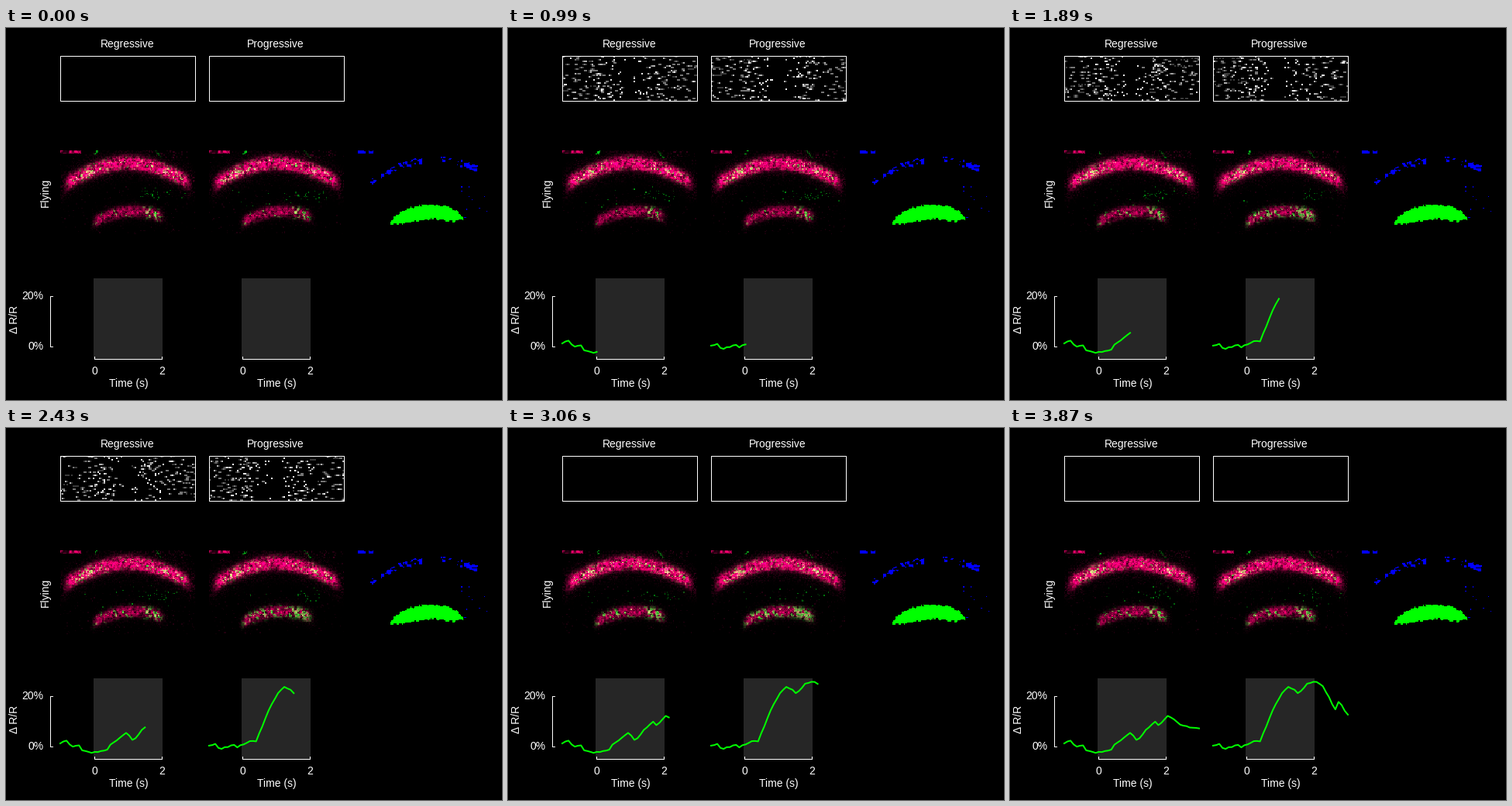
Write a matplotlib script that moves like this. It is 640 px wide and 480 px high and loops after 3960 ms.

```python
import numpy as np
import matplotlib.pyplot as plt
from matplotlib.animation import FuncAnimation
from matplotlib.patches import Rectangle

W, H, DPI = 640, 480, 100
FRAMES, INTERVAL = 44, 90
STIM_ON, STIM_OFF = 11, 32
LEFT, GAP, SPAN = 70, 192, 174
TOP, BOTTOM = 159, 266.5
ROWS, COLS = 79, 128
DOT_ROWS, DOT_COLS = 29, 87
ZERO, PER_PCT = 410.5, 3.225
PX = 72 / DPI
LIME = (0, 1, 0)

plt.rcParams["font.family"] = "Liberation Sans"
plt.rcParams["font.size"] = 10

fig = plt.figure(figsize=(W / DPI, H / DPI), dpi=DPI, facecolor="black")
ax = fig.add_axes([0, 0, 1, 1])
ax.axis("off")

X, Y = np.meshgrid(LEFT + (np.arange(COLS) + 0.5) * SPAN / COLS,
                   TOP + (np.arange(ROWS) + 0.5) * (BOTTOM - TOP) / ROWS)


# --- drawing helpers, in stage pixels

def label(x, y, text, ha="center", turn=0):
    ax.text(x, y, text, color="white", ha=ha, va="baseline",
            rotation=turn, rotation_mode="anchor")


def stroke(x, y):
    ax.plot(x, y, color="white", lw=PX, solid_capstyle="projecting")


def picture(image, x, y0, y1):
    return ax.imshow(image, extent=(x, x + SPAN, y1, y0), vmin=0, vmax=1,
                     cmap="gray", interpolation="nearest", aspect="auto",
                     zorder=1)


# --- response traces: key points joined by slightly noisy segments

def trace(keys, seed):
    steps = np.arange(FRAMES)
    wobble = np.random.default_rng(seed).normal(0, 0.25, FRAMES)
    at = list(keys)
    wobble[at] = 0
    return np.interp(steps, at, list(keys.values())) + wobble


TRACES = [
    trace({0: 1.1, 2: 2.2, 4: -0.2, 6: 0.3, 7: -1.7, 10: -2.7, 15: -1.4,
           16: 0.6, 21: 5.3, 23: 2.5, 26: 6.5, 29: 9.8, 30: 8.4, 33: 12.1,
           38: 8.2, 43: 7.1}, 1),
    trace({0: 0.2, 2: 0.9, 4: -1.1, 8: 0.5, 9: -0.5, 13: 2, 15: 1.9,
           19: 14.3, 22: 21.2, 24: 23.7, 27: 21.2, 30: 25, 33: 25.7,
           35: 24, 39: 14.7, 40: 17.7, 43: 12.6}, 2),
]


# --- tissue

def clumps(noise):
    """Soften noise into small clumps, spread evenly over 0..1."""
    soft = noise + 0.6 * sum(np.roll(noise, s, a)
                             for s in (-1, 1) for a in (0, 1))
    return soft.ravel().argsort().argsort().reshape(noise.shape) / noise.size


def band(mid, half, x0, x1, power):
    ends = np.clip((X - x0) / 9, 0, 1) * np.clip((x1 - X) / 9, 0, 1)
    return np.exp(-(np.abs(Y - mid) / half) ** power) * ends


def bump(x, y, rx, ry):
    return np.exp(-((X - x) / rx) ** 2 - ((Y - y) / ry) ** 2)


def patch(x0, x1, y0, y1):
    return (X > x0) & (X < x1) & (Y > y0) & (Y < y1)


ARC = 175 + 25 * (np.abs(X - 158) / 78) ** 1.8
LOW = 237.3 + 10.5 * ((X - 160) / 45) ** 2 - 0.05 * (X - 160)

upper = band(ARC, 9.5, 73, 240, 3)
halo = band(ARC, 15, 67, 247, 2)
core = band(ARC, 7, 76, 236, 2)
lower = band(LOW, 7.5, 110, 205, 3)
low_halo = band(LOW, 10, 107, 210, 2)
wings = (0.2 + np.exp(-((X - 105) / 26) ** 2)
         + np.exp(-((X - 207) / 22) ** 2))
tail = np.exp(-((X - 187) / 9) ** 2)
corner = patch(70, 97, 159, 163)
stem = (np.abs(X - 117.5 + 0.4 * (Y - 159)) < 1.6) & (Y < 165)
streak = (np.abs(X - 193 - 0.8 * (Y - 159)) < 1.5) & (Y < 168)
fringe = patch(226, 244, 186, 210) | patch(180, 235, 159, 168)

grain = np.random.default_rng(5)
red_tex, green_tex, low_tex = map(clumps, grain.random((3, ROWS, COLS)))


def tissue(i, side):
    rng = np.random.default_rng(100 * i + side + 1)
    a, b, c, d, e = rng.random((5, ROWS, COLS))
    mix = 0.6 * red_tex + 0.4 * a
    pct = max(0, TRACES[side][i])

    red = np.max([
        upper * (0.2 + 1.3 * mix),
        lower * (0.05 + 0.95 * mix),
        0.45 * a * halo * (b > 0.5),
        0.35 * a * low_halo * (b > 0.5),
        corner * (0.1 + 0.9 * red_tex),
        0.25 * a * fringe * (b > 0.8),
        0.14 * a * (b > 0.965),
    ], axis=0)

    spark = 0.6 * green_tex + 0.4 * c
    chance = 0.04 + 0.012 * pct + tail * (0.2 + 0.012 * pct)
    fired = clumps(0.7 * low_tex + 0.3 * c)
    cloud = bump(192 + 8 * side, 216, 20, 7)
    green = np.max([
        core * (spark > 0.86 - 0.24 * wings) * (0.35 + 0.7 * d),
        lower * (fired > 1 - chance) * (0.4 + 0.5 * d),
        (e < 0.1 * cloud) * (0.15 + 0.4 * d),
        patch(100, 210, 206, 232) * (e < 0.006) * 0.5 * d,
        stem * (e > 0.35) * (0.3 + 0.6 * d),
        streak * 0.4 * d,
    ], axis=0)
    return np.clip(np.dstack([red, green, 0.45 * red + 0.12 * green]), 0, 1)


def regions():
    rng = np.random.default_rng(8)
    out = np.zeros((ROWS, COLS, 3))
    lumps = clumps(clumps(rng.random((ROWS, COLS))))
    drift = 4 - 0.11 * (X - 84)
    ridge = band(ARC + drift, 6.5, 80, 234, 2)
    ridge[patch(153, 177, 150, 200)] = 0
    specks = (rng.random((ROWS, COLS)) > 0.985) & patch(200, 244, 205, 252)
    out[(ridge * lumps > 0.52) | (corner & (X < 91) & (lumps > 0.35))
        | specks, 2] = 1
    half = 9 * (1 - (np.abs(X - 159) / 47.5) ** 6) + 3 * (lumps - 0.5)
    out[(np.abs(Y - LOW - 0.8) < half) & patch(112, 206, 225, 260)] = LIME
    return out


# --- optic flow: dots streaming past, smeared by their own speed

def make_dots(seed, n=360):
    rng = np.random.default_rng(seed)
    side = rng.choice([-1, 1], n) * rng.uniform(0.3, 3, n)
    return side, rng.uniform(-3, 3, n), rng.integers(0, DOT_ROWS, n)


DOTS = [make_dots(11), make_dots(23)]


def flow(i, panel):
    grid = np.zeros((DOT_ROWS, DOT_COLS))
    if STIM_ON <= i <= STIM_OFF:
        side, depth, row = DOTS[panel]
        way = 1 if panel == 0 else -1
        for sub in np.arange(4) / 4:
            z = (depth + way * 0.16 * (i + sub) + 3) % 6 - 3
            turn = np.arctan2(side, z) / (0.6 * np.pi)
            col = np.floor(DOT_COLS / 2 * (1 + turn)).astype(int)
            ok = (col >= 0) & (col < DOT_COLS)
            np.add.at(grid, (row[ok], col[ok]), 0.23)
    return np.clip(grid, 0, 1)


# --- layout

stims, scans, lines = [], [], []
for p, title in enumerate(("Regressive", "Progressive")):
    x0 = LEFT + p * GAP
    t0, t2 = x0 + 44 - p, x0 + 131 - p
    label(x0 + 87 - p, 25, title)
    stims.append(picture(flow(0, p), x0, 36, 94))
    ax.add_patch(Rectangle((x0, 36), SPAN, 58, fill=False, ec="white",
                           lw=PX, zorder=3))
    scans.append(picture(tissue(0, p), x0, TOP, BOTTOM))
    ax.add_patch(Rectangle((t0 - 1, 323), 89, 104, fc="#262626", lw=0))
    stroke([t0, t0, t2, t2], [424, 427, 427, 424])
    label(t0 + 0.5, 447, "0")
    label(t2 + 0.5, 447, "2")
    label(x0 + 88 - p, 463, "Time (s)")
    lines.append(ax.plot([], [], color=LIME, lw=2 * PX, zorder=4)[0])

picture(regions(), LEFT + 2 * GAP, TOP, BOTTOM)
label(55, 212.5, "Flying", turn=90)
label(15, 375.5, "\u0394 R/R", turn=90)
label(48.5, 350, "20%", ha="right")
label(48.5, 415, "0%", ha="right")
stroke([60, 57, 57, 60], [346, 346, 411, 411])
ax.set_xlim(0, W)
ax.set_ylim(H, 0)


def draw(i):
    steps = np.arange(i + 1)
    for p in range(2):
        stims[p].set_data(flow(i, p))
        scans[p].set_data(tissue(i, p))
        lines[p].set_data(LEFT + p * GAP + steps * SPAN / (FRAMES - 1),
                          ZERO - PER_PCT * TRACES[p][:i + 1])
    return stims + scans + lines


def reset():
    return draw(0)


anim = FuncAnimation(fig, draw, frames=FRAMES, init_func=reset,
                     interval=INTERVAL, repeat=True, repeat_delay=0)
plt.show()
```
